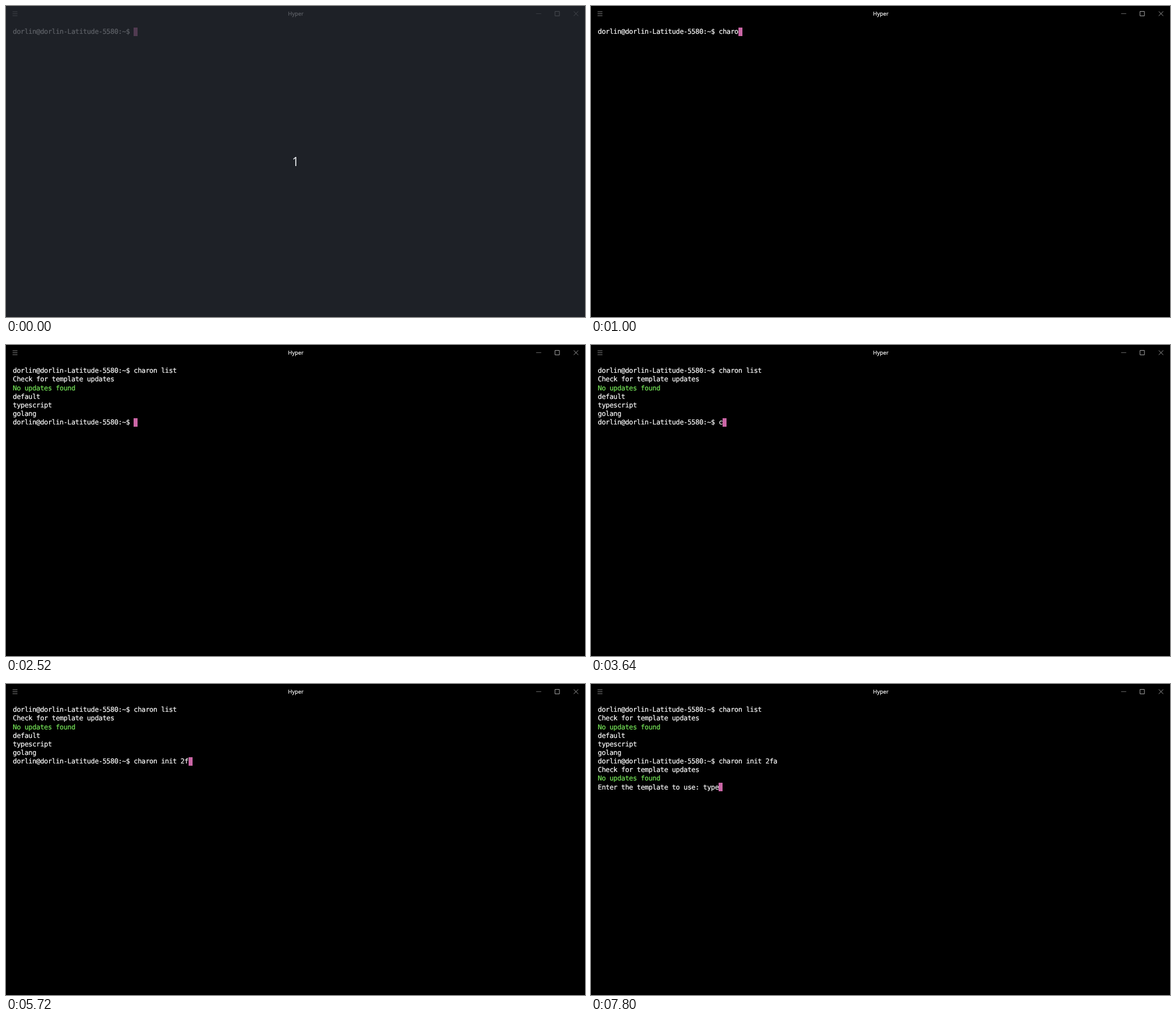
An HTML page that plays this animation: 1021 px wide and 548 px high, repeating every 8000 ms.

```html
<!DOCTYPE html>
<html lang="en">
<head>
<meta charset="utf-8">
<title>Terminal</title>
<style>
  html, body { margin: 0; width: 100%; height: 100%; overflow: hidden; background: #000; }
  #stage { --cell: 6.88px; --row: 15.17px; position: relative; width: 1021px; height: 548px; overflow: hidden; background: #000; color: #fff; }
  #title { position: absolute; left: 0; top: 4px; width: 1022px; text-align: center; font: 9.7px/20px "Noto Sans", sans-serif; text-rendering: geometricPrecision; -webkit-text-stroke: .15px; }
  svg { position: absolute; left: 0; top: 0; fill: none; stroke-width: 1; }
  #term { position: absolute; left: 12px; top: 38.2px; font: 12px/var(--row) "DejaVu Sans Mono", monospace; letter-spacing: calc(var(--cell) - 1ch); text-rendering: geometricPrecision; white-space: pre; -webkit-text-stroke: .2px; }
  #term div { height: var(--row); }
  .ok { color: #78ea5a; }
  #term #cursor { position: absolute; margin-top: -.5px; width: 7px; height: 15px; background: #cb66a6; }
  #veil { position: absolute; inset: 0; background: rgba(40, 44, 52, .75); }
  #veil span { position: absolute; left: 0; top: 254px; width: 1021px; text-align: center; font: 21px/40px "Noto Sans", sans-serif; color: #e3e5e9; }
</style>
</head>
<body>
<div id="stage">
  <div id="title">Hyper</div>
  <svg width="1021" height="548">
    <path stroke="#808080" d="M11.6 10.2h8.6M11.6 13.6h8.6M11.6 17.1h8.6"/>
    <path stroke="#666" d="M934.8 13.5h9"/>
    <path stroke="#aaa" d="M968.1 9.6h7.8v7.8h-7.8z"/>
    <path stroke="#999" d="M1001.2 9.5l7.8 8M1009 9.5l-7.8 8"/>
  </svg>
  <div id="term"></div>
  <div id="veil"><span>1</span></div>
</div>
<script>
const LOOP = 8000, CELL = 6.88, ROW = 15.17;
const PROMPT = "dorlin@dorlin-Latitude-5580:~$ ";
const CHECK = "Check for template updates\n";
const DONE = "No updates found\n";
const term = document.getElementById("term");
const veil = document.getElementById("veil");

const events = [[0, PROMPT]];
const print = (time, text) => events.push([time, text]);
const type = (text, times) => times.forEach((time, i) => print(time, text[i]));

type("charon ", [400, 560, 720, 840, 1000, 1160, 1320]);
type("list\n", [1560, 1720, 1800, 1920, 2000]);
print(2080, CHECK);
print(2520, DONE + "default\ntypescript\ngolang\n" + PROMPT);
type("charon ", [3640, 3800, 3920, 4080, 4200, 4360, 4520]);
type("init 2fa", [4720, 4880, 5040, 5200, 5360, 5520, 5720, 5880]);
print(6080, "\n" + CHECK);
print(6480, DONE + "Enter the template to use: ");
print(7360, "t");
print(7680, "yp");
print(7800, "e");

const cursor = document.createElement("div");
cursor.id = "cursor";
let shown = -1;

function render(count) {
  const lines = events.slice(0, count).map(e => e[1]).join("").split("\n");
  term.replaceChildren(...lines.map(text => {
    const line = document.createElement("div");
    line.textContent = text;
    if (text + "\n" === DONE) line.className = "ok";
    return line;
  }), cursor);
  const last = lines.length - 1;
  cursor.style.left = lines[last].length * CELL + "px";
  cursor.style.top = last * ROW + "px";
  veil.hidden = count > 1;
}

function tick() {
  const now = performance.now() % LOOP;
  const count = events.filter(e => e[0] <= now).length;
  if (count !== shown) render(shown = count);
  requestAnimationFrame(tick);
}
tick();
</script>
</body>
</html>
```
